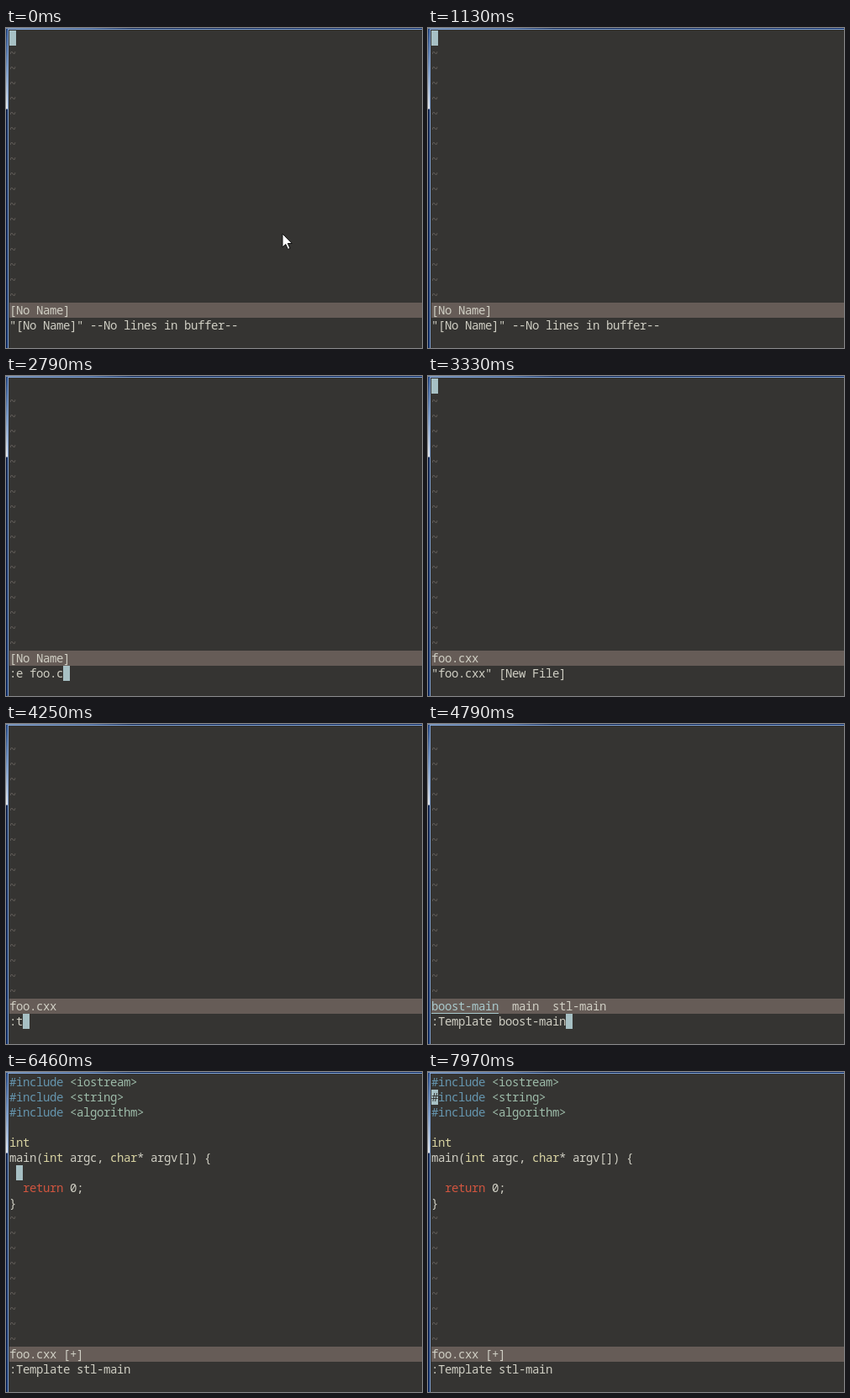
Animation, 495 px wide and 381 px high, one loop 8000 ms. Source, as an HTML page:

```html
<!DOCTYPE html>
<html lang="en">
<head>
<meta charset="utf-8">
<title>Editor template demo</title>
<style>
html, body { margin: 0; width: 100%; height: 100%; overflow: hidden; background: #353432; }
body { position: relative; }
body > * { position: absolute; }
pre, #caret { margin: 0; font: 14px/18px "Noto Sans Mono", "DejaVu Sans Mono", monospace; font-variant-ligatures: none; color: #d0cfc4; }
#text { left: 4px; top: 3px; }
#bar { left: 4px; right: 0; top: 327px; height: 18px; background: #665c57; }
#caret { width: 8px; height: 18px; background: #a7c0c4; color: #353432; white-space: pre; overflow: hidden; }
#left { left: 0; top: 0; width: 2px; height: 100%; background: linear-gradient(#23457f, #7f9cc4 50px, #e4e8ec 96px, #14264f 97px, #102a60); }
#top { left: 0; top: 0; width: 100%; height: 1px; background: linear-gradient(90deg, #7d93b2, #4a6695 100px, #0e2048 150px, #122c62); }
#edge { left: 2px; top: 1px; width: 100%; height: 100%; border: solid #7fa3d8; border-width: 1px 0 0 1px; box-sizing: border-box; }
#mouse { left: 328px; top: 244px; }
.t { color: #66615c; }
.p { color: #6595ae; }
.s { color: #9dbba9; }
.k { color: #d8d3a2; }
.r { color: #d2553f; }
.on { color: #a9c9cc; box-shadow: inset 0 -1px #a9c9cc; }
</style>
</head>
<body>
<div id="left"></div><div id="top"></div><div id="edge"></div>
<div id="bar"></div>
<pre id="text"></pre>
<div id="caret"></div>
<svg id="mouse" width="14" height="22"><path d="M1 1V17L4.8 13.5 7.5 19.5 10 18.4 7.3 12.5H12.3Z" fill="#fff" stroke="#111"/></svg>
<script>
const LOOP = 8000, ROWS = 18, CELL = 8, LINE = 18;
const $ = id => document.getElementById(id);
const esc = s => s.replace(/</g, "&lt;").replace(/>/g, "&gt;");
const span = (cls, s) => `<span class="${cls}">${esc(s)}</span>`;

const include = name => span("p", "#include ") + span("s", `<${name}>`);
const code = [
  ...["iostream", "string", "algorithm"].map(include),
  "",
  span("k", "int"),
  `main(${span("k", "int")} argc, ${span("k", "char")}* argv[]) {`,
  "",
  `  ${span("r", "return")} 0;`,
  "}"
];

const names = ["boost-main", "main", "stl-main"];
const menu = pick => names.map((n, i) => i === pick ? span("on", n) : n).join("  ");

// Each step changes part of the screen; caret is [column, row, character].
const steps = [];
const at = (time, change) => steps.push({ time, change });
const type = (time, cmd, more) => at(time, { cmd, caret: [cmd.length, 19], ...more });
const home = [0, 0];

at(0, { lines: [""], status: "[No Name]", cmd: '"[No Name]" --No lines in buffer--', caret: home, mouse: true, cut: 0 });
at(250, { caret: null });
at(520, { caret: home });
at(890, { caret: null });
at(1130, { caret: home, mouse: false });
type(1190, ":");
[1560, 1650, 1740, 2240, 2360, 2610, 2790, 2970, 3090]
  .forEach((time, i) => type(time, ":e foo.cxx".slice(0, i + 2)));
at(3270, { status: "foo.cxx", cmd: '"foo.cxx" [New File]', caret: null });
at(3330, { caret: home });
at(4010, { cmd: "", caret: null });
type(4070, ":");
type(4250, ":t");
type(4310, ":");
type(4370, ":T");
type(4430, ":Te");
type(4490, ":Tem");
type(4610, ":Template");
type(4670, ":Template ");
type(4790, ":Template boost-main", { status: menu(0) });
type(5470, ":Template main", { status: menu(1), caret: null });
type(5590, ":Template main");
type(6150, ":Template stl-main", { status: menu(2) });
at(6460, { lines: code, status: "foo.cxx [+]", caret: [1, 6] });
at(7140, { caret: [0, 0, "#"] });
at(7260, { caret: [0, 1, "#"] });
at(7790, { cut: 14 });
at(7880, { cut: 9 });
at(7970, { cut: 0 });

function draw(time) {
  const now = {};
  for (const s of steps) if (s.time <= time) Object.assign(now, s.change);
  const rows = Array.from({ length: ROWS }, (_, i) => now.lines[i] ?? span("t", "~"));
  const html = [...rows, now.status, esc(now.cmd)].join("\n");
  if (html !== draw.last) $("text").innerHTML = draw.last = html;

  const caret = $("caret");
  caret.hidden = !now.caret;
  if (now.caret) {
    const [col, row, char = ""] = now.caret;
    caret.style.left = 4 + col * CELL + "px";
    caret.style.top = 3 + row * LINE + "px";
    caret.style.clipPath = `inset(${now.cut}px 0 0)`;
    caret.textContent = char;
  }
  $("mouse").style.display = now.mouse ? "" : "none";
}

// Keep the glyphs on the terminal's cell grid.
$("text").textContent = "m".repeat(20);
$("text").style.letterSpacing = CELL - $("text").getBoundingClientRect().width / 20 + "px";

const start = performance.now();
function tick() {
  draw((performance.now() - start) % LOOP);
  requestAnimationFrame(tick);
}
tick();
</script>
</body>
</html>
```
